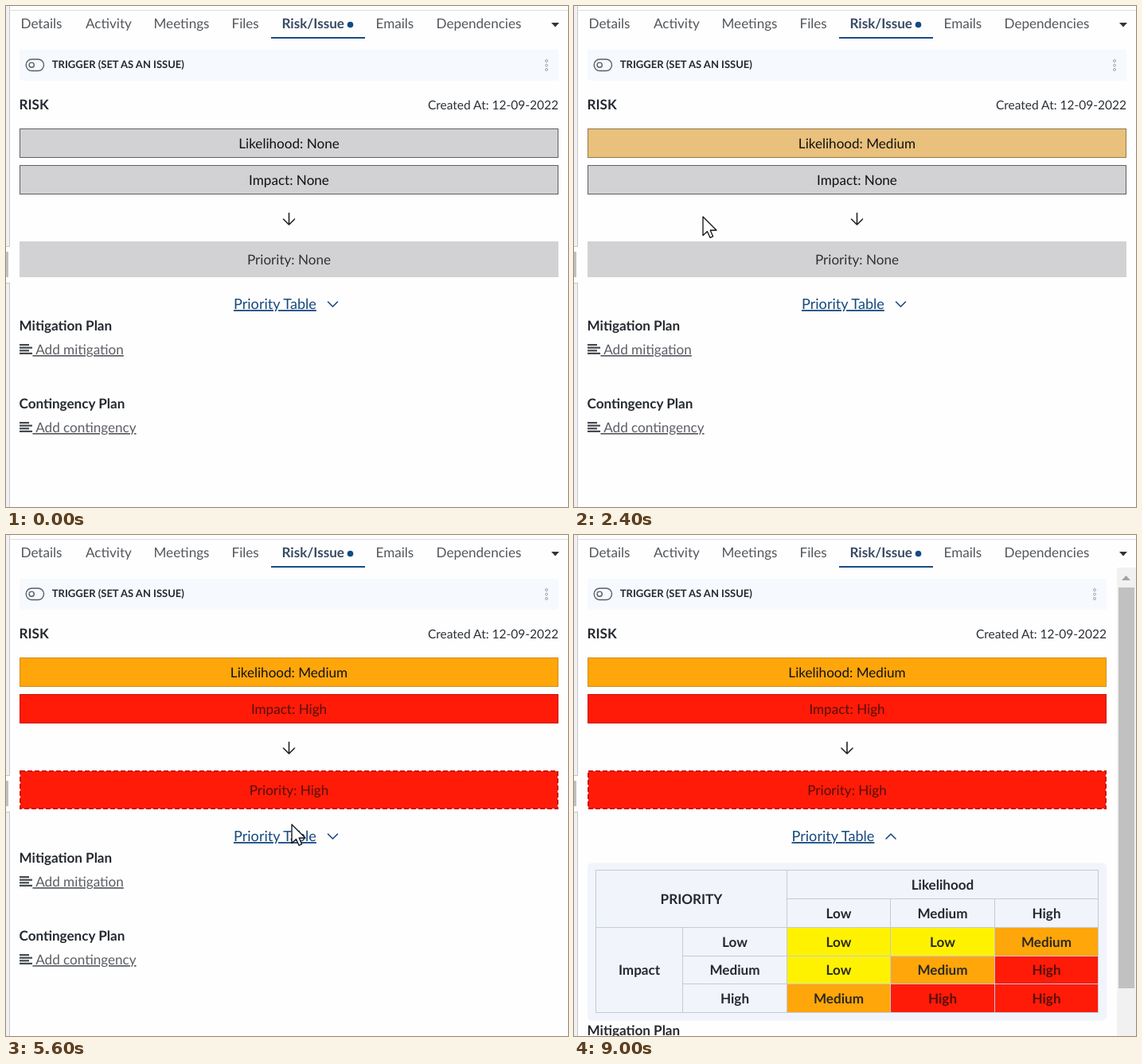
An HTML page for the animation above (9.2 s loop, 706 by 630 pixels).

```html
<!DOCTYPE html>
<html lang="en">
<head>
<meta charset="utf-8">
<title>Risk priority</title>
<style>
  html, body { margin: 0; width: 100%; height: 100%; overflow: hidden; background: #fefefe; }
  svg { display: block; width: 706px; height: 630px; }
  text { font: 17.1px Lato, "Open Sans", sans-serif; text-rendering: geometricPrecision; fill: #53575c; }
  .mid { text-anchor: middle; }
  .end { text-anchor: end; }
  .bold { font-weight: 700; fill: #24292f; }
  .link { text-decoration: underline; fill: #5a5e63; }
  .line { fill: none; stroke-linecap: round; stroke-linejoin: round; }
  .menu text { font-size: 19.6px; fill: #555; }
  .menu rect { filter: drop-shadow(0 8px 18px rgba(50, 50, 70, .14)); }
  .cursor path { fill: #fff; stroke: #111; stroke-width: 1.3; stroke-linejoin: round; }
</style>
</head>
<body>
<svg id="stage" viewBox="0 0 706 630"></svg>
<script>
const LOOP = 9200, TICK = 200, LEFT = 17;
const GREY = '#d2d2d4', YELLOW = '#fff200', ORANGE = '#ffa60a', RED = '#ff1b07', WINE = '#560f0c';
const stage = document.getElementById('stage');

// Cursor path: time, x, y, shape
const cursorPath = [
  [200, 685, 400, 'arrow'], [800, 463, 172, 'hand'], [1200, 463, 172, 'hand'],
  [1400, 420, 190, 'arrow'], [2000, 105, 266, 'hand'], [2200, 108, 266, 'hand'],
  [2400, 162, 265, 'arrow'], [2600, 190, 272, 'arrow'], [3200, 374, 227, 'hand'],
  [3600, 374, 227, 'hand'], [3800, 320, 260, 'arrow'], [4400, 66, 342, 'hand'],
  [4600, 66, 342, 'hand'], [4800, 140, 352, 'arrow'], [5600, 359, 364, 'arrow'],
  [5800, 358, 374, 'hand'], [6000, 358, 379, 'hand'], [6600, 358, 379, 'hand'],
  [6800, 420, 455, 'arrow'], [7200, 590, 650, 'arrow']
];
const cursorShapes = {
  arrow: '<path d="M0 0V23.5L5.5 18.5L9 26.3L12.6 24.7L9.2 17H17Z"/>',
  hand: '<path d="M-2.5 2C-2.5-.8 2.5-.8 2.5 2V11C4 9 7 9.5 7.3 12C9 10.5 11.3 11.5 11.5 13.5' +
        'C13.5 12.5 14.6 14 14.6 16C14.6 22 13.5 25 11.5 27V30.5H-1V28C-3 25-6 21-9.5 17' +
        'C-10.5 14.5-7.5 13-5.5 15L-2.5 18ZM2.5 11V16M7.3 12V16.5M11.5 13.5V17"/>'
};

const text = (x, y, str, cls = '', style = '') =>
  `<text x="${x}" y="${y}" class="${cls}" style="${style}">${str}</text>`;
const rect = (x, y, w, h, fill, extra = '') =>
  `<rect x="${x}" y="${y}" width="${w}" height="${h}" fill="${fill}" ${extra}/>`;
const line = (d, stroke, width = 1) =>
  `<path class="line" d="${d}" stroke="${stroke}" stroke-width="${width}"/>`;

function stateAt(t) {
  const scroll = t >= 6400;
  const panel = t < 6200 ? 0 : t < 6400 ? 25 : t < 6600 ? 191 : 198;
  const likelihood = t < 2400 ? ['None', GREY, '#606064', '#111']
    : t < 2600 ? ['Medium', '#e9c07c', '#94794c', '#111']
    : ['Medium', ORANGE, '#cf8f1c', '#111'];
  const impact = t >= 4800 ? ['High', RED, '#c9150c', WINE]
    : t === 3400 ? ['None', '#9ba4a2', '#444b52', '#66696c']
    : ['None', GREY, '#606064', '#111'];
  let menu = null;
  if (t >= 1200 && t < 2400) menu = { bar: 154, show: t < 1400 ? .95 : 1 };
  if (t >= 3400 && t < 4800) menu = { bar: 200, show: t < 3600 ? .5 : 1 };
  return { width: scroll ? 652 : 677, scroll, panel, likelihood, impact, menu, high: t >= 4800 };
}

function frame() {
  const tabs = [[18.5, 'Details'], [100, 'Activity'], [185.5, 'Meetings'], [283.5, 'Files'],
                [464.5, 'Emails'], [540.5, 'Dependencies']];
  return rect(0, 0, 706, 630, '#fefefe') + rect(0, 0, 4, 630, '#f0f0f4') +
    rect(0, 302, 4, 46, '#fefefe') + rect(0, 309, 3, 32, '#c0c0c2') +
    line('M0 302.5H4.5M0 348.5H4.5M4.5 0V302M4.5 348V630', '#c6c6cc') +
    line('M5 5.5H706', '#dedee2') +
    tabs.map(([x, name]) => text(x, 28, name)).join('') +
    text(346.5, 28, 'Risk/Issue', 'bold', 'fill:#384a64') +
    '<circle cx="432.5" cy="23.5" r="3.8" fill="#134a86"/>' +
    rect(333, 39, 118, 2, '#164d87') + '<path d="M685 21H695L690 26.5Z" fill="#333"/>';
}

function trigger(right) {
  const dots = [69, 74.5, 80].map(y =>
    `<circle cx="${right - 15}" cy="${y}" r="1.5" fill="none" stroke="#a3a5a9"/>`).join('');
  return rect(LEFT, 55, right - LEFT, 39, '#f6f9fd', 'rx="3"') +
    rect(25.2, 67, 22.3, 14.5, 'none', 'rx="7.2" stroke="#5b5f66" stroke-width="1.4"') +
    '<circle cx="32.2" cy="74.2" r="3.1" fill="none" stroke="#5b5f66" stroke-width="1.4"/>' +
    text(57.8, 78, 'TRIGGER (SET AS AN ISSUE)', 'bold', 'font-size:13px') + dots +
    text(16.5, 130, 'RISK', 'bold') +
    text(right, 130, 'Created At: 12-09-2022', 'end', 'font-size:15.5px;fill:#2b3036');
}

function bar(y, label, [value, fill, border, ink], width) {
  return rect(LEFT + .5, y + .5, width - 1, 36, fill, `stroke="${border}"`) +
    text(LEFT + width / 2, y + 25, `${label}: ${value}`, 'mid', `fill:${ink}`);
}

function priority(high, width, mid) {
  const box = high
    ? rect(LEFT + 1, 297, width - 2, 47, RED, 'stroke="#c9150c" stroke-width="2" stroke-dasharray="6 3"')
    : rect(LEFT, 296, width, 45, GREY);
  const label = high ? 'High' : 'None';
  return line(`M${mid} 260.5V275M${mid - 7} 268L${mid} 275L${mid + 7} 268`, '#222', 1.6) + box +
    text(mid, high ? 327 : 325, `Priority: ${label}`, 'mid', `fill:${high ? WINE : '#303236'}`);
}

function matrix(width, height) {
  const k = width / 652;
  const cols = [27.5, 136.5, 267.5, 397.5, 528.5, 658.5].map(x => LEFT + (x - LEFT) * k);
  const rows = [421.5, 457.5, 493.5, 529.5, 564.5, 600.5];
  const names = ['Low', 'Medium', 'High'];
  const fills = [YELLOW, ORANGE, RED];
  const cell = (c, r, c2, r2, label, fill = 'none', ink = '#24292f') =>
    rect(cols[c], rows[r], cols[c2] - cols[c], rows[r2] - rows[r], fill, 'stroke="#c6cad4"') +
    text((cols[c] + cols[c2]) / 2, (rows[r] + rows[r2]) / 2 + 6.2, label, 'mid bold', `fill:${ink}`);
  let out = cell(0, 0, 2, 2, 'PRIORITY') + cell(2, 0, 5, 1, 'Likelihood') + cell(0, 2, 1, 5, 'Impact');
  names.forEach((name, i) => {
    out += cell(i + 2, 1, i + 3, 2, name) + cell(1, i + 2, 2, i + 3, name);
    names.forEach((_, j) => {
      const level = Math.max(0, Math.min(2, i + j - 1));
      out += cell(j + 2, i + 2, j + 3, i + 3, names[level], fills[level], level === 2 ? WINE : '#2c2a20');
    });
  });
  return `<clipPath id="fold"><rect x="${LEFT}" y="412" width="${width}" height="${height + 1}"/></clipPath>` +
    rect(LEFT, 412.5, width, height, '#f1f4fb', 'rx="5"') + `<g clip-path="url(#fold)">${out}</g>`;
}

function plan(y, title, action) {
  const icon = [12, 16, 12, 16].map((w, i) => rect(LEFT, y + 17 + i * 3.6, w, 2.2, '#454a50')).join('');
  return text(16.5, y, title, 'bold') + icon + text(33.4, y + 30, '\u00a0' + action, 'link');
}

function menuBox({ bar: y, show }) {
  const top = y + 50 - 20 * (1 - show);
  const items = ['Low', 'Medium', 'High'].map((name, i) => text(35.3, top + 35 + i * 38.6, name)).join('');
  return `<g class="menu" opacity="${show}">${rect(LEFT, top, 192, 134, '#fff', 'rx="1"')}${items}</g>`;
}

function scrollbar(bottom) {
  return rect(682, 41, 24, 589, '#f1f1f2') + rect(684, 66, 20, bottom - 66, '#c1c1c2') +
    '<path d="M688 57H699L693.5 51Z" fill="#a3a3a5"/>';
}

function cursor(t) {
  const next = cursorPath.findIndex(p => p[0] > t);
  if (next < 1) return '';
  const [a, b] = [cursorPath[next - 1], cursorPath[next]];
  const f = (t - a[0]) / (b[0] - a[0]);
  const at = i => a[i] + (b[i] - a[i]) * f;
  return `<g class="cursor" transform="translate(${at(1)} ${at(2)})">${cursorShapes[a[3]]}</g>`;
}

function draw(t) {
  const s = stateAt(t);
  const mid = LEFT + s.width / 2;
  const drop = s.high ? 4 : 0;
  const chevY = 375 + drop, flip = s.panel ? -3 : 3;
  const planY = 408 + drop + s.panel * 1.095;
  stage.innerHTML = frame() + trigger(LEFT + s.width) +
    bar(154, 'Likelihood', s.likelihood, s.width) + bar(200, 'Impact', s.impact, s.width) +
    priority(s.high, s.width, mid) +
    text(mid - 69.5, 381 + drop, 'Priority Table', 'link', 'font-size:18.1px;fill:#17497f') +
    line(`M${mid + 49} ${chevY - flip}L${mid + 55} ${chevY + flip}L${mid + 61} ${chevY - flip}`, '#17497f', 1.6) +
    (s.panel ? matrix(s.width, s.panel) : '') +
    plan(planY, 'Mitigation Plan', 'Add mitigation') +
    plan(planY + 98, 'Contingency Plan', 'Add contingency') +
    (s.scroll ? scrollbar(t < 6600 ? 574 : 570) : '') +
    (s.menu ? menuBox(s.menu) : '') + cursor(t);
}

const start = performance.now();
let shown = -1;
function tick() {
  const t = Math.floor((performance.now() - start) % LOOP / TICK) * TICK;
  if (t !== shown) draw(shown = t);
  requestAnimationFrame(tick);
}
tick();
</script>
</body>
</html>
```
